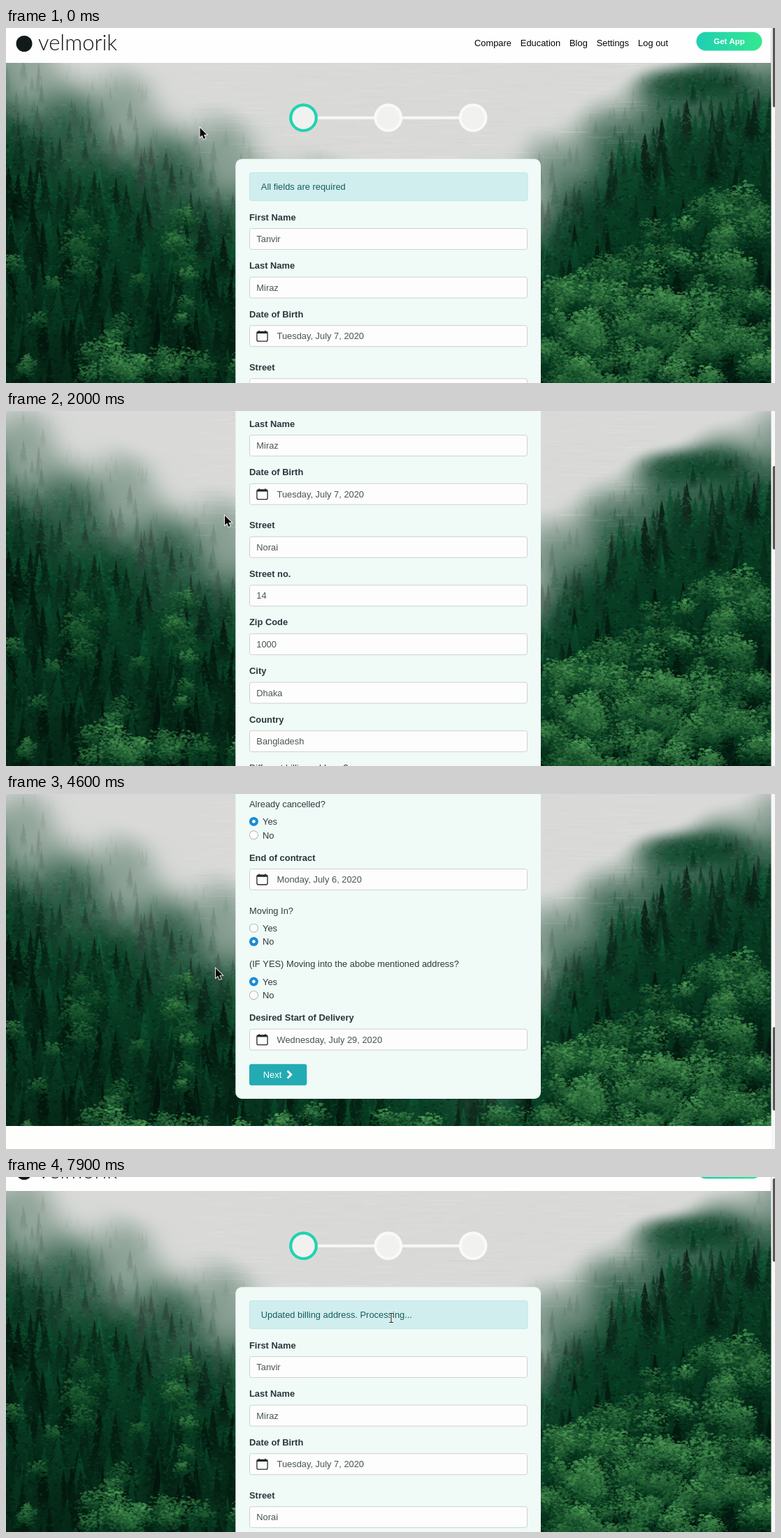
Recreate the animation shown at these times as an HTML page with a canvas. Size 1100 px wide and 509 px high, loop 8000 ms.

```html
<!DOCTYPE html>
<html lang="en">
<head>
<meta charset="utf-8">
<title>Sign-up form</title>
<style>
html, body { margin: 0; width: 100%; height: 100%; overflow: hidden; background: #fff; }
canvas { display: block; width: 1100px; height: 509px; }
</style>
</head>
<body>
<canvas id="stage" width="1100" height="509"></canvas>
<script>
const W = 1100, H = 509, LOOP = 8000, STEP = 100;
const ctx = document.getElementById('stage').getContext('2d');
const SANS = '"Liberation Sans", Arial, sans-serif';
const BASE = 12.885;

const clamp = (v, a = 0, b = 1) => Math.max(a, Math.min(b, v));

/* ---------- forest backdrop ---------- */

let seed = 20207;
function rnd() {
  seed = (seed * 1664525 + 1013904223) >>> 0;
  return seed / 4294967296;
}
const between = (a, b) => a + (b - a) * rnd();
const spread = r => (rnd() + rnd() - 1) * r;

// Two slopes meet in a valley: where the haze starts and where the dark wood starts
const farRidge = x => Math.min(0.45 * x - 45, 110 - 0.42 * (x - 780));
const nearRidge = x => Math.min(120 + 0.42 * x, 60 + 240 * Math.exp((765 - x) / 140));

// 0 is clear sky, 1 the edge of the wood, above that deep forest
function depth(x, y) {
  const f = farRidge(x), n = nearRidge(x);
  const d = y < n ? (y - f) / (n - f) : 1 + (y - n) / 110;
  const knoll = 0.75 * Math.exp(-(((x - 980) / 75) ** 2) - (((y - 78) / 24) ** 2));
  const drift = 0.09 * Math.sin(x / 41 + y / 23) + 0.06 * Math.sin(x / 17 - y / 31);
  return Math.max(0, d + knoll + (d > 0 ? drift : 0));
}

const SKY = [217, 218, 216], WOOD = [8, 64, 37];
function tone(d, light = 1) {
  const fog = Math.exp(-1.5 * d * d), dim = light * clamp(1.2 - 0.14 * d, 0.6, 1);
  return WOOD.map((w, i) => Math.round(w * dim * (1 - fog) + SKY[i] * fog));
}
const rgba = (c, alpha) => `rgba(${c},${alpha})`;

function paintSlopes(g) {
  const img = g.createImageData(W, H);
  for (let y = 0, p = 0; y < H; y++) {
    for (let x = 0; x < W; x++, p += 4) {
      img.data.set(tone(depth(x, y)), p);
      img.data[p + 3] = 255;
    }
  }
  g.putImageData(img, 0, 0);
  for (let i = 0; i < 500; i++) {
    g.fillStyle = rnd() < 0.5 ? 'rgba(255,255,255,.1)' : 'rgba(150,150,150,.05)';
    g.fillRect(between(250, 900), rnd() * 190, between(10, 60), 1);
  }
}

function conifer(g, x, y, h, d) {
  const w = h * between(0.17, 0.25), tiers = 9;
  const light = between(0.35, 1.5), solid = clamp(d * 0.75, 0, 0.9);
  const fill = g.createLinearGradient(0, y, 0, y + h);
  fill.addColorStop(0, rgba(tone(d + 0.2, light), solid));
  fill.addColorStop(0.6, rgba(tone(d + 0.25, light * 0.8), solid * 0.75));
  fill.addColorStop(1, rgba(tone(d, light * 0.6), 0));
  g.fillStyle = fill;
  g.beginPath();
  g.moveTo(x, y);
  for (const side of [-1, 1]) {
    for (let i = 1; i <= tiers; i++) {
      const k = side < 0 ? i : tiers + 1 - i, r = side * w * k / tiers, ty = y + h * k / tiers;
      const tip = [x + r * between(0.7, 1.3), ty], notch = [x + r * 0.5, ty - h * 0.03];
      for (const p of side < 0 ? [tip, notch] : [notch, tip]) g.lineTo(...p);
    }
  }
  g.fill();
}

function dab(g, x, y, r, color) {
  g.fillStyle = color;
  g.beginPath();
  g.ellipse(x, y, r * 1.4, r * 0.75, spread(0.8), 0, 7);
  g.fill();
}

// Loose crown of leaves, lit from above
function crown(g, x, y, r, lum) {
  for (let i = 0; i < r * 10; i++) {
    const dx = spread(1.3), dy = spread(1.1) + dx * dx * 0.4;
    const up = clamp(0.45 - dy * 0.7 + spread(0.45)) * lum;
    const c = [8 + 82 * up, 58 + 112 * up, 32 + 62 * up].map(Math.round);
    dab(g, x + dx * r, y + dy * r, between(0.7, 2.2), rgba(c, 0.65));
  }
}

function paintCrowns(g) {
  const crowns = [];
  for (let i = 0; i < 150; i++) {
    const x = between(775, 1100), top = 245 + 0.6 * Math.max(0, 1000 - x);
    crowns.push([x, between(top, 525), between(14, 26), between(0.35, 1)]);
  }
  for (let i = 0; i < 32; i++)
    crowns.push([between(130, 780), between(460, 520), between(14, 24), between(0.5, 1)]);
  for (let i = 0; i < 26; i++)
    crowns.push([between(0, 270), between(250, 500), between(11, 22), between(0.3, 0.75)]);
  crowns.sort((a, b) => a[1] - b[1]).forEach(c => crown(g, ...c));
}

function paintForest() {
  const c = document.createElement('canvas');
  c.width = W; c.height = H;
  const g = c.getContext('2d');
  paintSlopes(g);
  const trees = [];
  for (let i = 0; i < 1100; i++) {
    const x = between(-20, 1120), f = farRidge(x);
    const y = between(f, 530), size = 18 + 85 * clamp((y - f) / 330);
    trees.push([x, y, size * between(0.6, 1.3), depth(x, y)]);
  }
  for (let x = 866; x < 1100; x += 12)
    trees.push([x, nearRidge(x) + spread(22), between(80, 120), 1.5]);
  trees.sort((a, b) => a[1] - b[1]).forEach(t => conifer(g, ...t));
  for (let i = 0; i < 14000; i++) {
    const x = rnd() * W, y = rnd() * H, d = depth(x, y);
    if (d > 0.8) dab(g, x, y, between(0.6, 2.2), rgba(tone(d, rnd() < 0.5 ? 0.3 : 1.8), 0.3));
  }
  paintCrowns(g);
  return c;
}

/* ---------- page parts ---------- */

const bold = size => `bold ${size}px ${SANS}`;

function text(str, x, y, color = '#30393d', font = BASE + 'px ' + SANS) {
  ctx.font = font;
  ctx.fillStyle = color;
  ctx.fillText(str, x, y);
}

function box(x, y, w, h, r, fill, line) {
  ctx.beginPath();
  ctx.roundRect(x, y, w, h, r);
  ctx.fillStyle = fill;
  ctx.fill();
  if (line) {
    ctx.strokeStyle = line;
    ctx.lineWidth = 1;
    ctx.stroke();
  }
}

function disc(x, y, r, fill) {
  ctx.fillStyle = fill;
  ctx.beginPath();
  ctx.arc(x, y, r, 0, 7);
  ctx.fill();
}

function calendar(x, y) {
  ctx.strokeStyle = '#23282a';
  ctx.lineWidth = 1.3;
  ctx.beginPath();
  ctx.roundRect(x + 0.7, y + 1.2, 15.2, 13.8, 2.2);
  ctx.stroke();
  ctx.fillStyle = '#23282a';
  ctx.fillRect(x + 1, y + 1.2, 14.6, 2.6);
  for (const dx of [3.2, 11.8]) ctx.fillRect(x + dx, y - 0.4, 1.6, 2);
}

function radio(y, label, on) {
  disc(354.4, y, 6.5, on ? '#1a8cd5' : '#a9b4b4');
  disc(354.4, y, on ? 2.4 : 5.6, '#fefefe');
  text(label, 367, y + 4.7);
}

// Each part draws itself around y and returns its height
function field(y, label, value, date) {
  text(label, 348, y + 4.5, '#28363c', bold(BASE));
  box(348.5, y + 16.5, 397, 30, 3, '#fefdfd', '#cbd3d2');
  if (date) calendar(358.2, y + 24);
  text(value, date ? 387.5 : 358.3, y + 36, '#495457');
  return date ? 76 : 69.6;
}
const dateField = (y, label, value) => field(y, label, value, true);

function question(y, label, yes) {
  text(label, 348, y + 4.5);
  radio(y + 25.2, 'Yes', yes);
  radio(y + 44.6, 'No', !yes);
  return 76.8;
}

function heading(y, label) {
  text(label, 348, y + 18.2, '#6b7775', bold(22.55));
  return 46.7;
}

function nextButton(y) {
  box(348, y - 9.3, 82.3, 30.5, 3, '#22abb3');
  text('Next', 367.8, y + 10.2, '#fff');
  ctx.strokeStyle = '#fff';
  ctx.lineWidth = 2.8;
  ctx.beginPath();
  ctx.moveTo(402.6, y + 0.4);
  ctx.lineTo(407.8, y + 5.6);
  ctx.lineTo(402.6, y + 10.8);
  ctx.stroke();
}

const FORM = [
  [field, 'First Name', 'Tanvir'], [field, 'Last Name', 'Miraz'],
  [dateField, 'Date of Birth', 'Tuesday, July 7, 2020'],
  [field, 'Street', 'Norai'], [field, 'Street no.', '14'], [field, 'Zip Code', '1000'],
  [field, 'City', 'Dhaka'], [field, 'Country', 'Bangladesh'],
  [question, 'Different billing address?', false],
  [heading, 'Current Provider Info'],
  [field, 'Provider Name', 'Pelvio'], [field, 'Rate', '1.0'],
  [field, 'Contract/Consumer ID', 'GYUHJI'], [field, 'Meter ID', '3456YFGHJ'],
  [field, 'Consumption', '100'],
  [question, 'Already cancelled?', true],
  [dateField, 'End of contract', 'Monday, July 6, 2020'],
  [question, 'Moving In?', false],
  [question, '(IF YES) Moving into the abobe mentioned address?', true],
  [dateField, 'Desired Start of Delivery', 'Wednesday, July 29, 2020']
];

function header() {
  ctx.fillStyle = '#fffefe';
  ctx.fillRect(0, 0, 1094, 50);
  disc(26, 22.5, 11.5, '#121a19');
  text('velmorik', 46, 32, '#111', '300 31px Lato, "Open Sans", sans-serif');
  let x = 670;
  for (const item of ['Compare', 'Education', 'Blog', 'Settings', 'Log out']) {
    text(item, x, 26, '#050505');
    x += ctx.measureText(item).width + 12.9;
  }
  const pill = ctx.createLinearGradient(988, 0, 1081, 0);
  pill.addColorStop(0, '#1fcfb4');
  pill.addColorStop(1, '#33e88f');
  box(987.5, 5.8, 94, 26.6, 13.3, pill);
  text('Get App', 1012.3, 23, '#fff', bold(11.45));
}

function steps() {
  ctx.fillStyle = '#f7f7f6';
  ctx.fillRect(425, 126.8, 243, 4);
  for (let i = 0; i < 3; i++) {
    const x = 425.5 + i * 121.3;
    disc(x, 128.7, 20.4, i ? '#f9f9f8' : '#1fd3b0');
    disc(x, 128.7, 16.2, '#f1f1f0');
  }
}

function page(notice) {
  header();
  steps();
  box(328.3, 187.8, 436.7, 1540.7, 9, '#f0faf6');
  box(348.5, 207.5, 397.5, 40, 3, '#d1eeef', '#bfe5e8');
  text(notice, 364.8, 232.2, '#175c5c');
  let y = 271;
  for (const [part, ...args] of FORM) y += part(y, ...args);
  nextButton(y);
  ctx.fillStyle = '#fefefd';
  ctx.fillRect(0, 1767.5, W, 700);
}

/* ---------- pointer ---------- */

function arrow(x, y) {
  const edge = new Path2D('M0 0V13.6L3.1 10.8L5.4 16L7.8 15L5.5 9.9L9.8 9.7Z');
  ctx.save();
  ctx.translate(x, y);
  ctx.fillStyle = '#0a0a0a';
  ctx.strokeStyle = '#fff';
  ctx.lineWidth = 1.7;
  ctx.stroke(edge);
  ctx.fill(edge);
  ctx.restore();
}

function beam(x, y) {
  const edge = new Path2D('M-3 -6.5H3M0 -6.5V6.5M-3 6.5H3');
  ctx.save();
  ctx.translate(x, y);
  for (const [w, color] of [[2.6, '#fff'], [1.1, '#222']]) {
    ctx.strokeStyle = color;
    ctx.lineWidth = w;
    ctx.stroke(edge);
  }
  ctx.restore();
}

function hand(x, y) {
  box(x - 1.8, y, 3.6, 11, 1.8, '#fff', '#111');
  box(x - 4.5, y + 6.5, 11.5, 9.5, 3, '#fff', '#111');
  ctx.fillStyle = '#fff';
  ctx.fillRect(x - 1.2, y + 4, 2.4, 6);
}

/* ---------- timeline ---------- */

// Moves are [from ms, to ms, ...target]; the value rests between them
const SCROLL = [[500, 1500, 143.6], [1600, 2000, 322.5], [2100, 2600, 632], [2800, 3300, 937],
  [3600, 4200, 1291.5], [5200, 6200, 201.5], [6200, 6600, 30]];
const POINTER = [[100, 200, 306, 274], [200, 400, 313, 150], [4300, 4600, 300, 250],
  [4600, 4900, 385, 398], [5100, 5400, 299.5, 234], [7200, 7400, 408, 228],
  [7500, 7700, 727, 230], [7700, 7900, 551, 202]];

function follow(moves, start, t) {
  return moves.reduce((now, [a, b, ...to]) =>
    now.map((v, i) => v + (to[i] - v) * clamp((t - a) / (b - a))), start);
}

const forest = paintForest();

function draw(t) {
  const [y] = follow(SCROLL, [0], t);
  const spot = follow(POINTER, [277.5, 143], t);
  const notice = t < 5200 ? 'All fields are required'
    : t < 6800 ? 'Updated basic info. Processing...' : 'Updated billing address. Processing...';
  ctx.drawImage(forest, 0, 0);
  ctx.save();
  ctx.translate(0, -y);
  page(notice);
  ctx.restore();
  ctx.fillStyle = '#f8f8f8';
  ctx.fillRect(1094.5, 0, 5.5, H);
  box(1096.8, -6 + y * 0.2635, 5, 119.5, 2, '#565656');
  const pointer = t >= 7900 ? beam : t >= 4900 && t <= 5100 ? hand : arrow;
  pointer(...spot);
}

let shown = -1;
function tick() {
  const t = Math.floor(performance.now() % LOOP / STEP) * STEP;
  if (t !== shown) draw(shown = t);
  requestAnimationFrame(tick);
}
tick();
</script>
</body>
</html>
```
